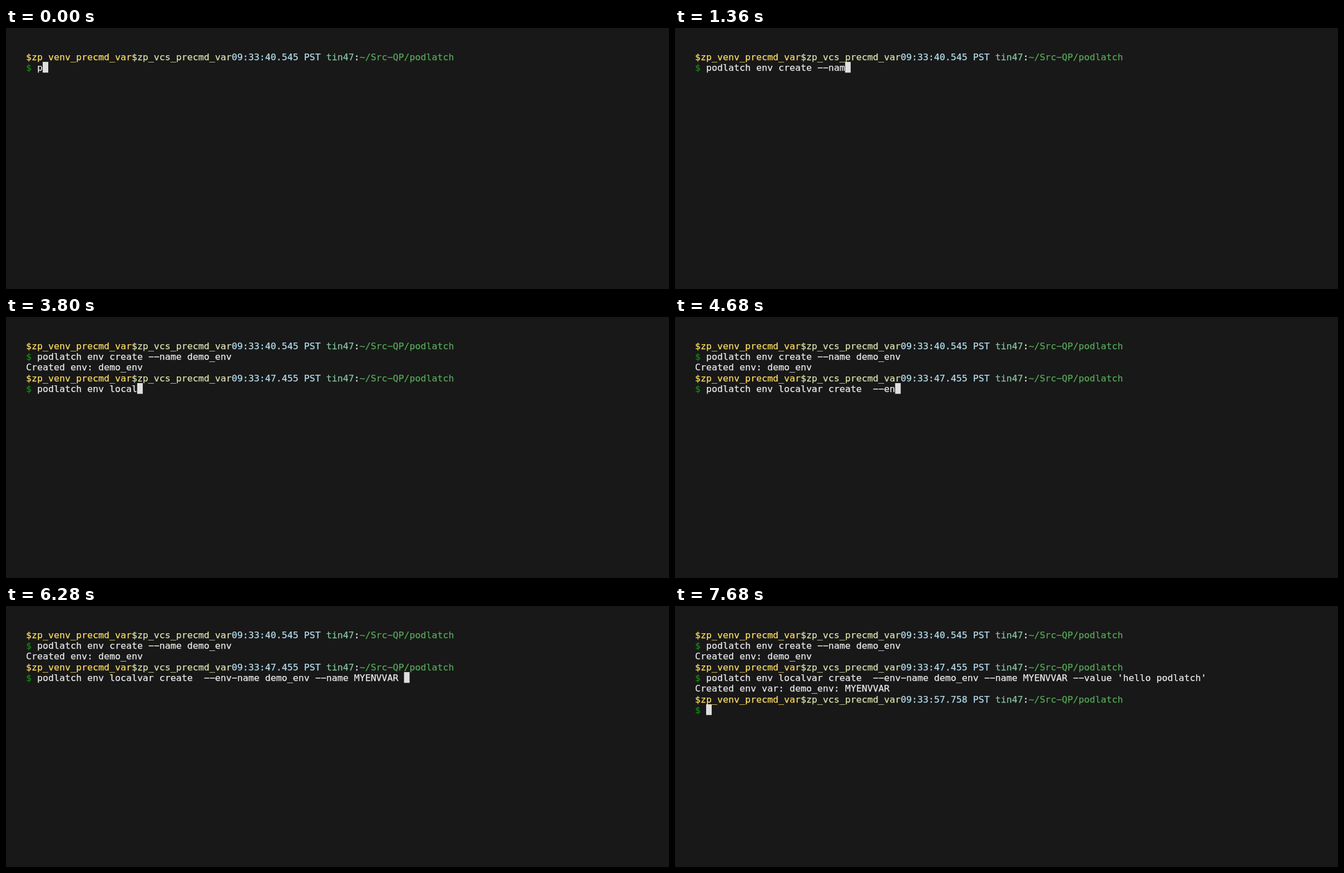
An HTML page with a canvas for the animation above (8 s loop, 1192x470 px).

```html
<!DOCTYPE html>
<html lang="en">
<head>
<meta charset="utf-8">
<title>Terminal session</title>
<style>
  html, body { margin: 0; width: 100%; height: 100%; overflow: hidden; background: #181818; }
  canvas { display: block; }
</style>
</head>
<body>
<canvas id="screen" width="1192" height="470"></canvas>
<script>
const ctx = document.getElementById('screen').getContext('2d');

const LOOP = 8000, TICK = 40;
const LEFT = 36, TOP = 41.7, CELL = 9.994, LINE = 19.33, ASCENT = 15.9;
const FONT = '16.6px "DejaVu Sans Mono", "Liberation Mono", monospace';
const COLOR = {
  back: '#181818', text: '#ebebeb', cursor: '#dfdfdf', dollar: '#158a15',
  venv: '#fbdc62', vcs: '#dde2ae', time: '#b5ddee', host: '#86c5a4', path: '#55a857'
};

const CREATE = 'podlatch env create --name demo_env';
const SETVAR = "podlatch env localvar create  --env-name demo_env --name MYENVVAR --value 'hello podlatch'";

// Steady typing from n0 characters at t0 to n1 characters at t1
function typed(t, t0, n0, t1, n1) {
  const p = Math.min(1, (t - t0) / (t1 - t0));
  return p < 0 ? 0 : Math.floor(n0 + (n1 - n0) * p);
}

const createCount = t => typed(t, 0, 1, 1920, CREATE.length);

// The second command speeds up a little halfway
const setvarCount = t => t < 5360
  ? typed(t, 2840, 1, 5360, 47)
  : typed(t, 5360, 47, 7400, SETVAR.length);

// Draws on the character grid and returns the next free column
function write(row, col, str, color) {
  ctx.fillStyle = ctx.strokeStyle = color;
  const y = Math.round(TOP + row * LINE + ASCENT);
  for (const ch of str) {
    // the minus sign is as wide as the terminal's hyphen
    const glyph = ch === '-' ? '\u2212' : ch, x = LEFT + col * CELL;
    ctx.fillText(glyph, x, y);
    ctx.strokeText(glyph, x, y);
    col++;
  }
  return col;
}

function prompt(row, clock) {
  const parts = [
    ['$zp_venv_precmd_var', COLOR.venv], ['$zp_vcs_precmd_var', COLOR.vcs],
    [clock + ' PST ', COLOR.time], ['tin47', COLOR.host], [':', COLOR.text],
    ['~/Src-QP/podlatch', COLOR.path]
  ];
  let col = 0;
  for (const [str, color] of parts) col = write(row, col, str, color);
  write(row + 1, 0, '$', COLOR.dollar);
}

function cursor(row, col) {
  ctx.fillStyle = COLOR.cursor;
  ctx.fillRect(LEFT + col * CELL, TOP + row * LINE, CELL, LINE);
}

function command(row, str, count) {
  return write(row, 2, str.slice(0, count), COLOR.text);
}

function draw(t) {
  ctx.fillStyle = COLOR.back;
  ctx.fillRect(0, 0, 1192, 470);
  ctx.font = FONT;
  ctx.lineWidth = 0.25;

  prompt(0, '09:33:40.545');
  let row = 1, col = command(1, CREATE, createCount(t));
  if (t >= 2120) [row, col] = [2, 0];
  if (t >= 2240) {
    write(2, 0, 'Created env: demo_env', COLOR.text);
    prompt(3, '09:33:47.455');
    row = 4;
    col = command(4, SETVAR, setvarCount(t));
  }
  if (t >= 7600) [row, col] = [5, 0];
  if (t >= 7640) {
    write(5, 0, 'Created env var: demo_env: MYENVVAR', COLOR.text);
    row = 6;
  }
  if (t >= 7680) {
    prompt(6, '09:33:57.758');
    [row, col] = [7, 2];
  }
  const blinkedOff = t >= 2680 && t < 2840;
  if (!blinkedOff) cursor(row, col);
}

const start = performance.now();
function loop() {
  const t = (performance.now() - start) % LOOP;
  draw(Math.floor(t / TICK) * TICK);
  requestAnimationFrame(loop);
}
loop();
</script>
</body>
</html>
```
